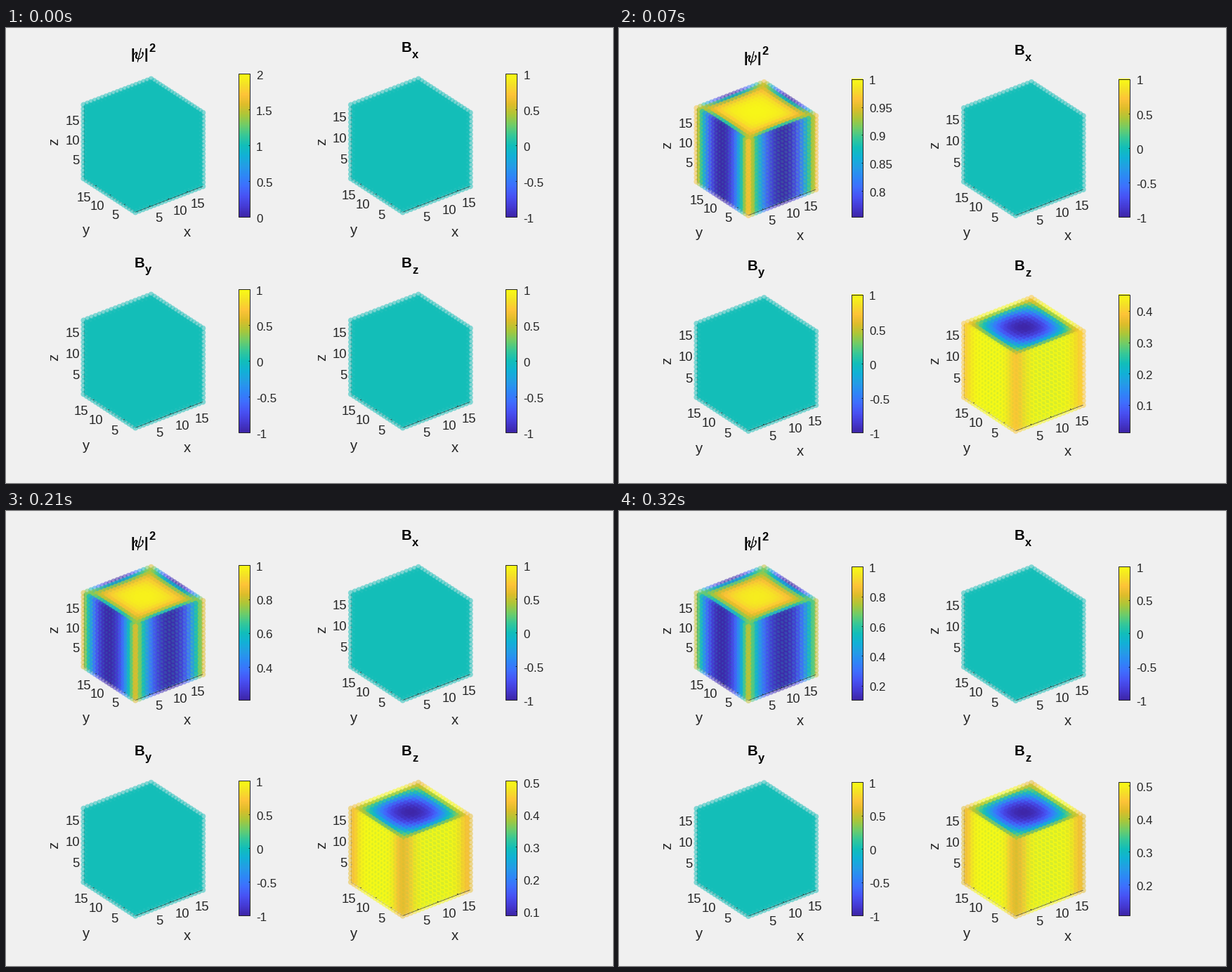
Animation, 864 px wide and 648 px high, one loop 350 ms. Source, as a matplotlib script:

```python
import numpy as np
import matplotlib.pyplot as plt
from matplotlib.animation import FuncAnimation
from matplotlib.colors import LinearSegmentedColormap
from matplotlib.patheffects import withStroke

W, H = 864, 648
FRAMES, STEP = 5, 70
INK = (0.15, 0.15, 0.15)
DX, DY = 380.5, 307          # panel spacing

plt.rcParams["font.family"] = "Liberation Sans"

PARULA = LinearSegmentedColormap.from_list("parula", [
    (0.242, 0.150, 0.660), (0.271, 0.230, 0.835), (0.281, 0.323, 0.958),
    (0.244, 0.436, 0.999), (0.179, 0.529, 0.968), (0.140, 0.618, 0.900),
    (0.069, 0.695, 0.839), (0.070, 0.746, 0.726), (0.216, 0.784, 0.592),
    (0.440, 0.802, 0.407), (0.672, 0.779, 0.223), (0.870, 0.739, 0.165),
    (0.997, 0.766, 0.220), (0.961, 0.883, 0.153), (0.977, 0.984, 0.081)], N=256)

# Per-frame layout and field settings
DROP = [0, 4.5, 6.3, 7.2, 7.6]
BAR_TOP = [66, 73.5, 78, 78, 80]
PSI_RANGE = [(0, 2), (0.753, 1), (0.402, 1), (0.203, 1), (0.1015, 1)]
PSI_STEP = [0.5, 0.05, 0.1, 0.2, 0.2]
PSI_POWER = [1, 1, 0.92, 0.85, 0.75]
BZ_RANGE = [(-1, 1), (0.0114, 0.4515), (0.0575, 0.487), (0.087, 0.504), (0.106, 0.5106)]
BZ_STEP = [0.5, 0.1, 0.1, 0.1, 0.1]
BZ_DIP = [0, 0.13, 0.17, 0.19, 0.2]
PENETRATION = 2.8            # screening length in cells

# Orthographic view: azimuth -37.5, elevation 30
AZ, EL = np.radians(37.5), np.radians(30)
SIZE = 121
X_DIR = SIZE * np.array([np.cos(AZ), -np.sin(AZ) * np.sin(EL)])
Y_DIR = SIZE * np.array([-np.sin(AZ), -np.cos(AZ) * np.sin(EL)])
Z_DIR = SIZE * np.array([0, -np.cos(EL)])
FRONT = np.array([184.2, 262.3])
LAYERS = 5                   # deeper points are hidden


def project(x, y, z):
    return FRONT + np.multiply.outer(x, X_DIR) + np.multiply.outer(y, Y_DIR) \
        + np.multiply.outer(z, Z_DIR)


def lattice(n):
    """Outer layers of points, far to near, with a mask of the silhouette."""
    x, y, z = (a.ravel() for a in np.meshgrid(*[np.arange(n)] * 3, indexing="ij"))
    m = n - 1
    seen = np.minimum(np.minimum(x, y), m - z) < LAYERS
    x, y, z = x[seen], y[seen], z[seen]
    near = z * np.sin(EL) - np.cos(EL) * (x * np.sin(AZ) + y * np.cos(AZ))
    order = np.argsort(near, kind="stable")
    x, y, z = x[order], y[order], z[order]
    rim = ((z == 0) & ((x == 0) | (y == 0))) | ((x == 0) & (y == m)) \
        | ((y == 0) & (x == m)) | ((z == m) & ((x == m) | (y == m)))
    return x, y, project(x / m, y / m, z / m), rim


LATTICES = {n: lattice(n) for n in (18, 19)}


def screening(i, n, inset=1.0):
    """Field decaying from both faces, 1 at the faces for inset 1."""
    half = (n - 1) / 2
    s = (i - half) / half
    r = half / PENETRATION
    return np.cosh(r * inset * s) / np.cosh(r)


def flat(x, y, n, k):
    return np.full(len(x), 0.5)


def density(x, y, n, k):
    if k == 0:
        return flat(x, y, n, k)
    # loss follows the squared gradient of the screened field
    loss = (screening(x, n) * (1 - screening(y, n, 0.906))) ** 2 \
        + (screening(y, n) * (1 - screening(x, n, 0.906))) ** 2
    return 1 - (loss / loss.max()) ** PSI_POWER[k]


def field_z(x, y, n, k):
    if k == 0:
        return flat(x, y, n, k)
    b = 1 - (1 - screening(x, n)) * (1 - screening(y, n))
    u = (b - b.min()) / (1 - b.min())
    dx, dy = (np.minimum(i, n - 1 - i) for i in (x, y))
    return np.clip(u - BZ_DIP[k] * np.exp(-(dx ** 2 + dy ** 2) / 6.5), 0, 1)


fig = plt.figure(figsize=(W / 72, H / 72), dpi=72, facecolor="#f0f0f0")
ax = fig.add_axes([0, 0, 1, 1])


def label(x, y, s, size, ha="center", rise=0.358, **kw):
    """Text whose glyphs are centred vertically on y."""
    ax.text(x, y + rise * size, s, fontsize=size, ha=ha, va="baseline",
            **{"color": INK, **kw})


def line(a, b, alpha, width=0.8):
    ax.plot([a[0], b[0]], [a[1], b[1]], color="black", alpha=alpha, lw=width,
            solid_capstyle="butt")


def cube(n, field, k, shift):
    x, y, pts, rim = LATTICES[n]
    rgba = PARULA(field(x, y, n, k))
    rgba[:, 3] = np.where(rim, 0.5, 0.75)
    p = pts + shift
    ax.scatter(p[:, 0], p[:, 1], s=8.2 ** 2, c=rgba, linewidths=0)

    o = FRONT + shift
    left = o + Y_DIR
    line(o, o + X_DIR, 0.6)
    line(o, left, 0.18)
    line(left, left + Z_DIR, 0.18)
    inward_x, inward_y = X_DIR / SIZE * 2.5, Y_DIR / SIZE * 2.5
    for v in (5, 10, 15):
        t = (v - 1) / (n - 1)
        for a, d, alpha in ((o + t * X_DIR, inward_y, 0.8),
                            (o + t * Y_DIR, inward_x, 0.6),
                            (left + t * Z_DIR, inward_x, 0.2)):
            line(a, a + d, alpha, 1)


def axis_text(n, shift):
    sx, sy = shift
    if n == 19:
        zs = (187, 159, 131)
        ys = ((155, 265), (130, 252), (111, 240))
        xs = ((217, 269), (248, 259), (273, 249))
    else:
        zs = (186.5, 156.3, 126.3)
        ys = ((154, 265), (127.5, 250), (107, 237))
        xs = ((218, 268.5), (250.5, 258), (278.5, 248))
    for v, zy, yp, xp in zip("5 10 15".split(), zs, ys, xs):
        label(105 + sx, zy + sy, v, 18.5, ha="right")
        label(yp[0] + sx, yp[1] + sy, v, 18.5)
        label(xp[0] + sx, xp[1] + sy, v, 18.5)
    label(258 + sx, 291.7 + sy, "x", 20.4, rise=0.26)
    label(114.5 + sx, 290.5 + sy, "y", 20.4, rise=0.155)
    ax.text(69 + sx, 162 + sy, "z", fontsize=20.4, rotation=90, ha="center",
            va="center", color=INK)


def title(name, shift):
    sx, sy = shift
    bold = dict(weight="bold", color="black")
    if name == "psi":
        for x in (180, 199.5):
            label(x, 37 + sy, "|", 20.4, **bold)
        ax.text(189.7, 44 + sy, r"$\psi$", fontsize=21.5, ha="center",
                va="baseline", math_fontfamily="cm", color="black",
                path_effects=[withStroke(linewidth=0.5, foreground="black")])
        label(208, 28 + sy, "2", 16.5, **bold)
    else:
        label(190 + sx, 26.3 + sy, "B", 20.4, **bold)
        label(202.3 + sx, 38.3 + sy, name, 16.5, rise=0.26 if name != "y" else 0.22, **bold)


def colorbar(col, row, top, lim, step):
    sx, sy = col * 380, row * DY
    x0, x1 = 331.4 + sx, 347.4 + sx
    y0, y1 = top - 0.6 + sy, 269.4 + sy
    ax.imshow(np.linspace(1, 0, 256)[:, None], cmap=PARULA, aspect="auto",
              extent=(x0, x1, y1, y0), vmin=0, vmax=1, zorder=1)
    lo, hi = lim
    for i in range(int(np.ceil(lo / step - 1e-6)), int(np.floor(hi / step + 1e-6)) + 1):
        v = i * step
        y = y1 - (v - lo) / (hi - lo) * (y1 - y0)
        line((x1 - 2.5, y), (x1, y), 0.85)
        label(356 + col * DX, y + 1.5, f"{v:g}", 17, ha="left")
    ax.add_patch(plt.Rectangle((x0, y0), x1 - x0, y1 - y0, fill=False,
                               ec=INK, lw=1, zorder=3))


def draw(k):
    ax.clear()
    unit = ((-1, 1), 0.5)
    panels = [
        (0, 0, 19, "psi", density, (PSI_RANGE[k], PSI_STEP[k])),
        (1, 0, 18, "x", flat, unit),
        (0, 1, 18, "y", flat, unit),
        (1, 1, 18, "z", field_z, (BZ_RANGE[k], BZ_STEP[k])),
    ]
    for col, row, n, name, field, (lim, step) in panels:
        shift = np.array([col * DX, row * DY + DROP[k]])
        cube(n, field, k, shift)
        axis_text(n, shift)
        title(name, shift)
        colorbar(col, row, BAR_TOP[k], lim, step)
    ax.set_xlim(0, W)
    ax.set_ylim(H, 0)
    ax.axis("off")
    return []


anim = FuncAnimation(fig, draw, frames=FRAMES, init_func=lambda: [],
                     interval=STEP, repeat=True)
plt.show()
```
